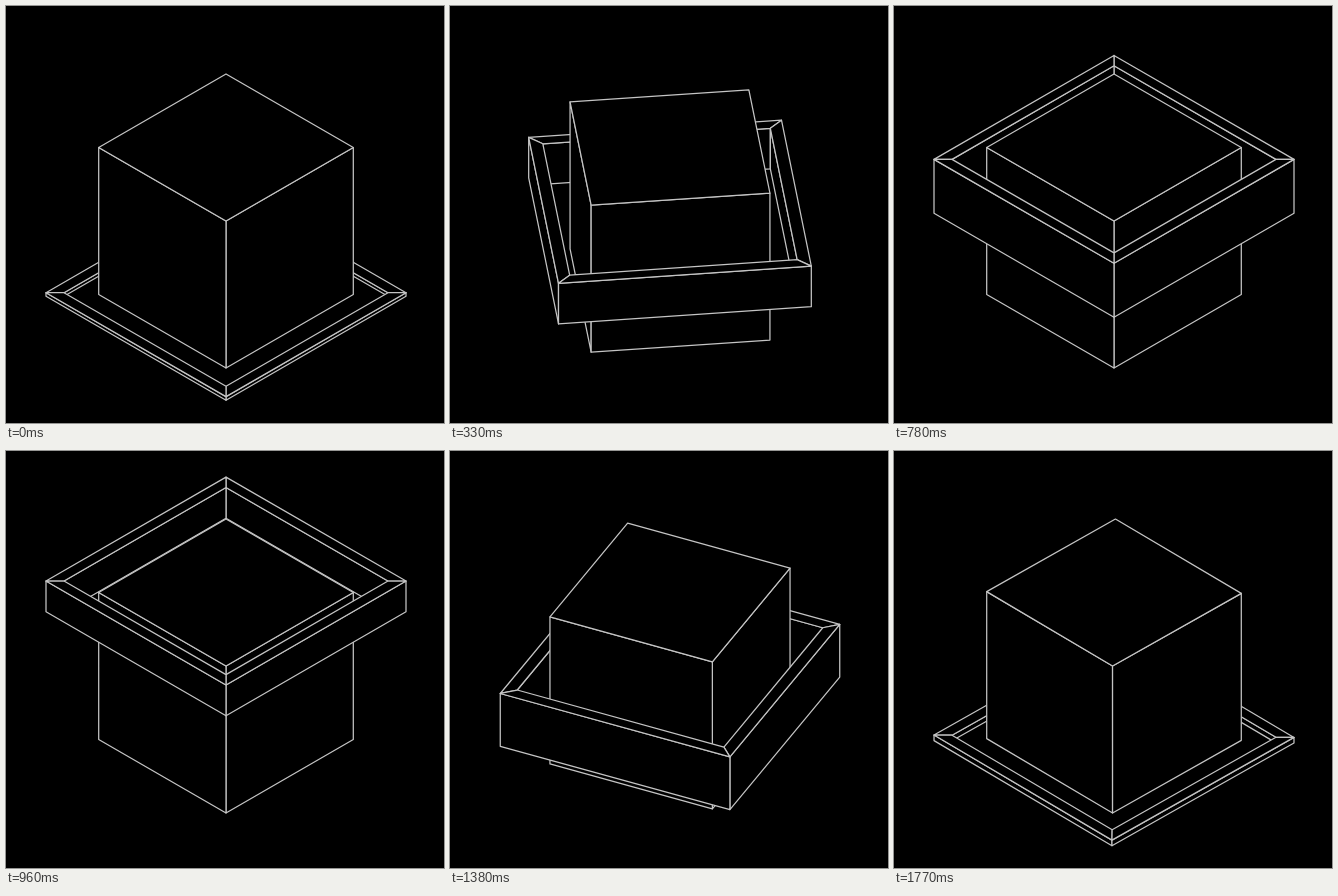
Write an HTML page with a canvas that moves like this. It is 438 px wide and 417 px high and loops after 1800 ms.

```html
<!DOCTYPE html>
<html lang="en">
<head>
<meta charset="utf-8">
<title>Cube and ring</title>
<style>
html, body { margin: 0; width: 100%; height: 100%; overflow: hidden; background: #000; }
canvas { display: block; }
</style>
</head>
<body>
<canvas id="stage" width="438" height="417"></canvas>
<script>
const ctx = document.getElementById('stage').getContext('2d');

const LOOP = 1800, STEP = 30, SPAN = 300;
const CX = 220, CY = 215;
const TILT = 1 / Math.sqrt(3);   // ground plane seen from the isometric angle
const HALF = 73.5;               // half the cube's height on screen
const CUBE_R = 127.3, OUTER_R = 180, INNER_R = 162;

// One key every 300 ms, in screen pixels; the loop closes on the first key.
const middleKeys = [288.5, 215, 251.75, 141.5, 196.7, 256.4];
const heightKeys = [3.6, 36.75, 73.5, 36.75, 14.7, 73.5];

const smooth = p => p * p * (3 - 2 * p);

// Hermite spline, flat at every peak and valley.
function spline(keys, t) {
  const n = keys.length;
  const key = i => keys[(i + n) % n];
  const slope = i => {
    const before = key(i) - key(i - 1), after = key(i + 1) - key(i);
    return before * after > 0 ? (before + after) / 2 : 0;
  };
  const i = Math.floor(t / SPAN), p = t / SPAN - i, q = 1 - p;
  const s = smooth(p);
  return key(i) * (1 - s) + key(i + 1) * s
    + slope(i) * p * q * q - slope(i + 1) * p * p * q;
}

const point = (r, angle, y) => [CX + r * Math.cos(angle), y + r * Math.sin(angle) * TILT];

function face(...points) {
  ctx.beginPath();
  points.forEach(p => ctx.lineTo(p[0], p[1]));
  ctx.closePath();
  ctx.fill();
  ctx.stroke();
}

function wall(r, a, b, top, bottom) {
  face(point(r, a, top), point(r, b, top), point(r, b, bottom), point(r, a, bottom));
}

function ringSide(side, top, bottom) {
  const { a, b, front } = side;
  wall(front ? OUTER_R : INNER_R, a, b, top, bottom);
  face(point(OUTER_R, a, top), point(OUTER_R, b, top),
       point(INNER_R, b, top), point(INNER_R, a, top));
}

function cube(sides) {
  const top = CY - HALF, bottom = CY + HALF;
  sides.filter(s => s.front).forEach(s => wall(CUBE_R, s.a, s.b, top, bottom));
  face(...sides.slice().sort((s, u) => s.a - u.a).map(s => point(CUBE_R, s.a, top)));
}

function draw(t) {
  const turn = t < 600 ? t / 600 : t < 1200 ? 0 : (t - 1200) / 600;
  const spin = smooth(turn) * Math.PI / 2;
  const middle = spline(middleKeys, t), height = spline(heightKeys, t);
  const top = middle - height / 2, bottom = middle + height / 2;

  const sides = [0, 1, 2, 3].map(k => {
    const a = k * Math.PI / 2 - spin, b = a + Math.PI / 2;
    const depth = Math.sin((a + b) / 2);
    return { a, b, depth, front: depth > 1e-6 };
  }).sort((s, u) => s.depth - u.depth);

  ctx.fillStyle = '#000';
  ctx.fillRect(0, 0, 438, 417);
  ctx.strokeStyle = '#c4c4c4';
  ctx.lineWidth = 1.25;
  ctx.lineJoin = 'round';

  sides.filter(s => !s.front).forEach(s => ringSide(s, top, bottom));
  cube(sides);
  sides.filter(s => s.front).forEach(s => ringSide(s, top, bottom));
}

const start = performance.now();
function tick() {
  const t = (performance.now() - start) % LOOP;
  draw(Math.floor(t / STEP) * STEP);
  requestAnimationFrame(tick);
}
tick();
</script>
</body>
</html>
```
